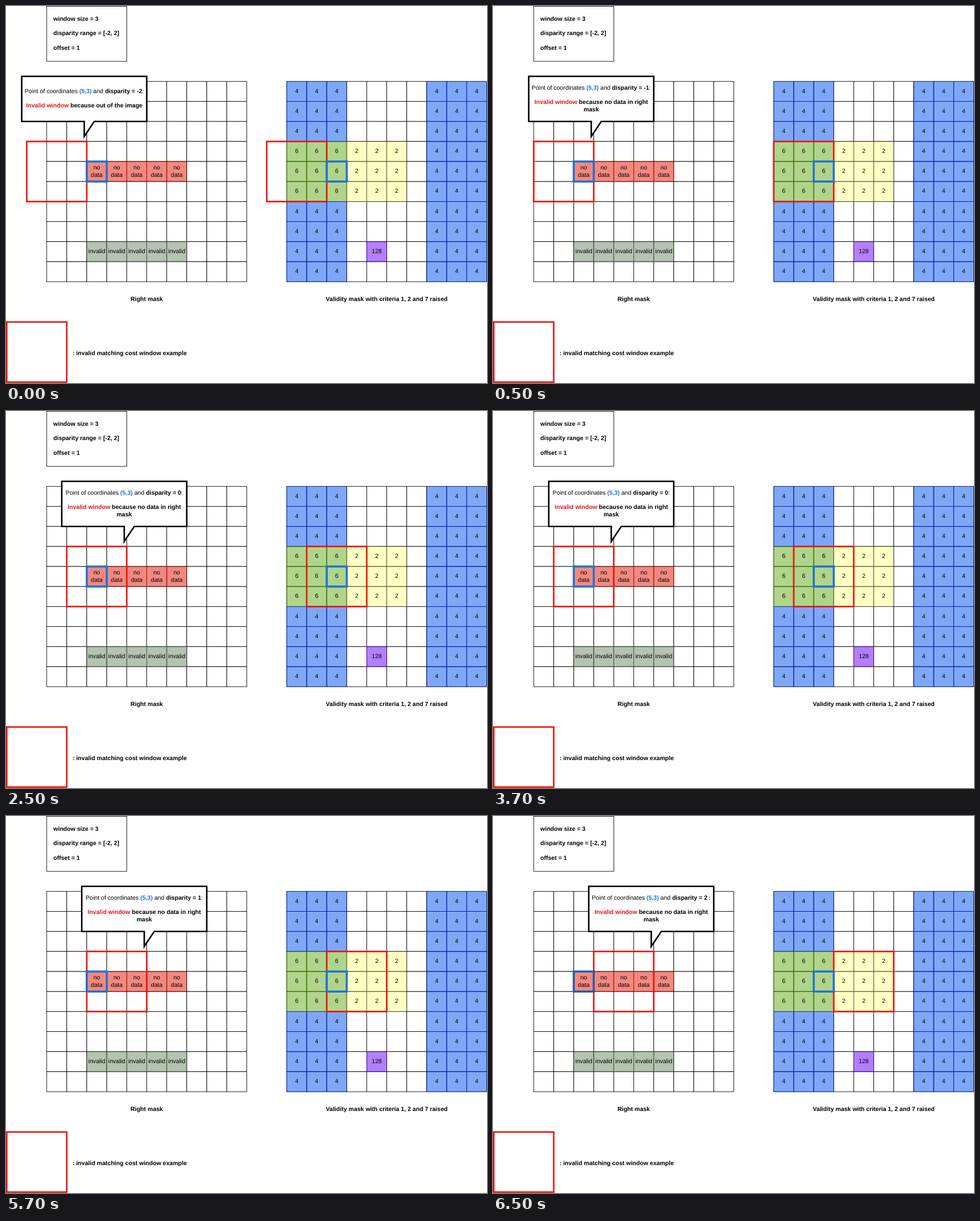
Animation of 846x662 px, one loop 8 s. Source, as an HTML page:

```html
<!DOCTYPE html>
<html lang="en">
<head>
<meta charset="utf-8">
<title>Validity mask</title>
<style>
  html, body { margin: 0; width: 100%; height: 100%; overflow: hidden; background: #fff; }
  svg {
    display: block; width: 846px; height: 662px;
    font: 12px "Liberation Sans", Arial, sans-serif;
    text-rendering: geometricPrecision;
  }
  .mid { text-anchor: middle; }
  .bold { font-weight: bold; }
  .bad { fill: #e3141c; font-weight: bold; }
  .coord { fill: #1976dc; font-weight: bold; }
  .line { fill: #fff; stroke: #000; }
  .tint { fill-opacity: .5; stroke-opacity: .5; }
  .window { fill: none; stroke: #e81208; stroke-width: 3; }
  .point { fill: none; stroke: #1b72d4; stroke-width: 4; }
  .bubble { fill: #fff; stroke: #000; stroke-width: 3; stroke-miterlimit: 10; }

  .scene { visibility: hidden; animation: hold 8s step-end infinite; }
  .scene:nth-child(1) { animation-name: first; }
  .scene:nth-child(2) { animation-delay: -7.5s; }
  .scene:nth-child(3) { animation-delay: -5.5s; }
  .scene:nth-child(4) { animation-delay: -3.5s; }
  .scene:nth-child(5) { animation-name: last; }
  .scene:nth-child(5) .point:first-of-type { stroke: #1b5fae; }
  @keyframes first { 0% { visibility: visible; } 6.25%, 100% { visibility: hidden; } }
  @keyframes hold { 0% { visibility: visible; } 25%, 100% { visibility: hidden; } }
  @keyframes last { 0% { visibility: hidden; } 81.25%, 100% { visibility: visible; } }
</style>
</head>
<body>
<svg viewBox="0 0 846 662">
  <!-- The diagram is laid out on a 40-unit grid. -->
  <g transform="scale(.8794) translate(1.5 .5)">
    <rect class="line" x="80" y="0" width="160" height="110"/>
    <g class="bold">
      <text x="93.2" y="29">window size = 3</text>
      <text x="93.2" y="57.8">disparity range = [-2, 2]</text>
      <text x="93.2" y="86.6">offset = 1</text>
      <text class="mid" x="280" y="588">Right mask</text>
      <text class="mid" x="760" y="588">Validity mask with criteria 1, 2 and 7 raised</text>
      <text x="131.5" y="696.3">: invalid matching cost window example</text>
    </g>
    <rect class="window" x="0" y="630.5" width="120" height="120"/>
    <g id="grids"></g>
    <g id="scenes"></g>
  </g>
</svg>
<script>
const CELL = 40, LEFT = 80, RIGHT = 560, TOP = 150, LINE = 14.4;
const BLUE = ['#0050ef', '#001dbc'], GREEN = ['#60a917', '#2d7600'],
      YELLOW = ['#ffff88', '#36393d'], RED = ['#e51400', '#b20000'],
      SAGE = ['#6d8764', '#3a5431'], PURPLE = ['#6a00ff', '#3700cc'];

const box = (cls, x0, col, row, size, extra = '') =>
  `<rect class="${cls}" x="${x0 + col * CELL}" y="${TOP + row * CELL}" ` +
  `width="${size * CELL}" height="${size * CELL}" ${extra}/>`;

const label = (x, y, s, cls = '') => `<text class="mid ${cls}" x="${x}" y="${y}">${s}</text>`;

// Baseline of the first line in a block of n lines centred on y.
const firstLine = (y, n) => y + 3 - (n - 1) * LINE / 2;

function cell(x0, col, row, [fill, stroke], ...lines) {
  const x = x0 + (col + .5) * CELL;
  const y = firstLine(TOP + (row + .5) * CELL, lines.length);
  return box('tint', x0, col, row, 1, `fill="${fill}" stroke="${stroke}"`) +
    lines.map((s, i) => label(x, y + i * LINE, s)).join('');
}

function drawGrids() {
  let base = '', tints = '';
  for (let row = 0; row < 10; row++) {
    for (let col = 0; col < 10; col++) {
      base += box('line', LEFT, col, row, 1) + box('line', RIGHT, col, row, 1);
      const band = row > 2 && row < 6;
      if (band && col < 3) tints += cell(RIGHT, col, row, GREEN, 6);
      else if (band && col < 6) tints += cell(RIGHT, col, row, YELLOW, 2);
      else if (col < 3 || col > 6) tints += cell(RIGHT, col, row, BLUE, 4);
    }
  }
  for (let col = 2; col < 7; col++) {
    tints += cell(LEFT, col, 4, RED, 'no', 'data') + cell(LEFT, col, 8, SAGE, 'invalid');
  }
  return base + tints + cell(RIGHT, 4, 8, PURPLE, 128);
}

function drawScene(disparity) {
  const col = disparity + 1, x = 195 + col * CELL;
  const out = disparity === -2;
  const y = firstLine(185, out ? 3 : 4);
  const colon = disparity === 2 ? ' :' : ':';
  const reason = out ? 'out of the image' : 'no data in right';
  return '<g class="scene"><g>' +
    box('window', LEFT, col, 3, 3) + box('window', RIGHT, col, 3, 3) + '</g><g>' +
    box('point', LEFT, 2, 4, 1) + box('point', RIGHT, 2, 4, 1) + '</g>' +
    `<path class="bubble" d="M${x - 125} 140h250v90h-105l-20 30v-30h-125z"/>` +
    label(x, y, 'Point of coordinates <tspan class="coord">(5,3)</tspan> and ' +
      `<tspan class="bold">disparity = ${disparity}</tspan>${colon}`) +
    label(x, y + 2 * LINE, `<tspan class="bad">Invalid window</tspan> because ${reason}`, 'bold') +
    (out ? '' : label(x, y + 3 * LINE, 'mask', 'bold')) + '</g>';
}

document.getElementById('grids').innerHTML = drawGrids();
document.getElementById('scenes').innerHTML = [-2, -1, 0, 1, 2].map(drawScene).join('');
</script>
</body>
</html>
```
